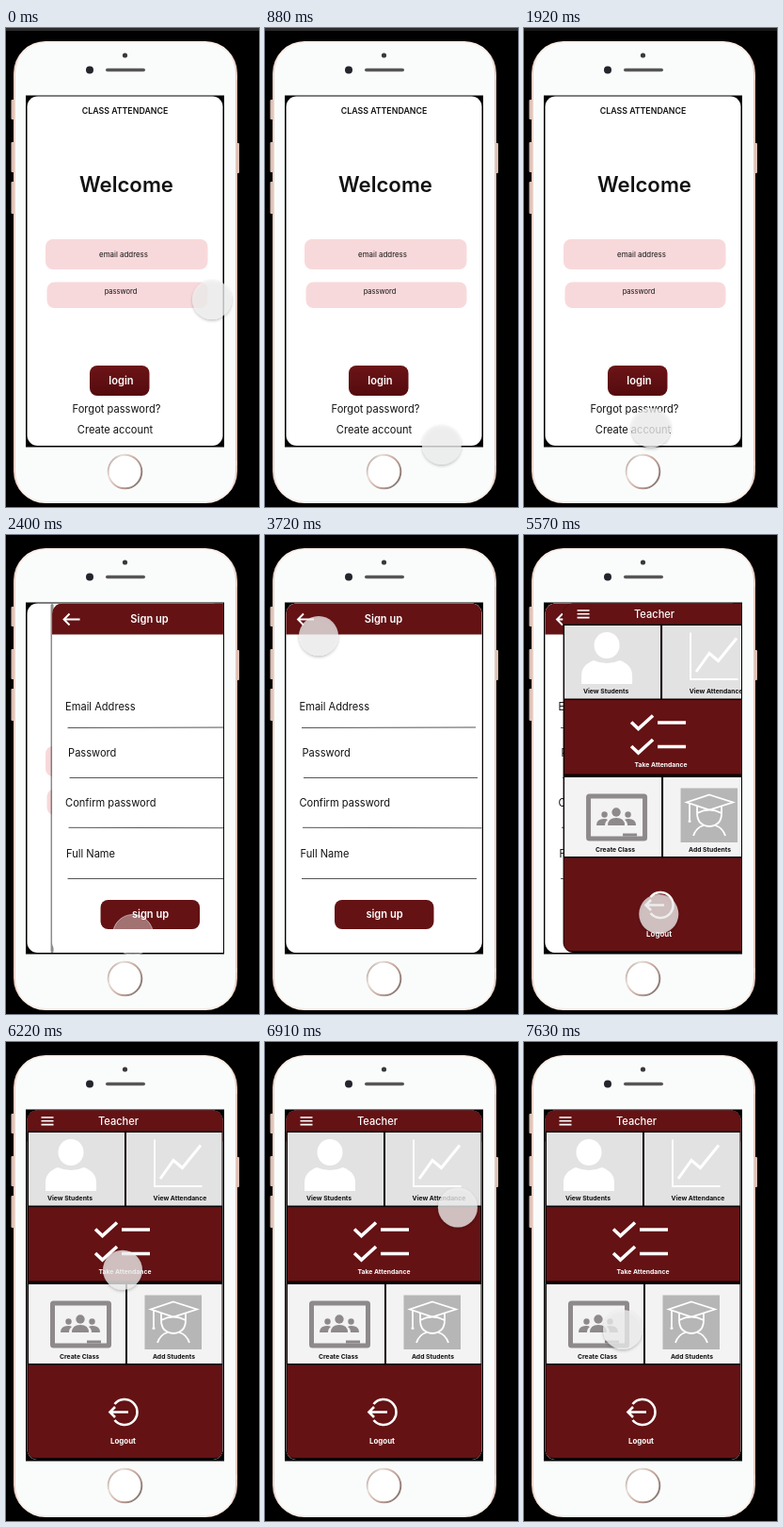
Animation of 269 by 508 pixels, one loop 8000 ms. Source, as an HTML page:

```html
<!DOCTYPE html>
<html lang="en">
<head>
<meta charset="utf-8">
<title>Class attendance prototype</title>
<style>
  html, body { margin: 0; width: 100%; height: 100%; overflow: hidden; background: #000; }
  svg { display: block; width: 269px; height: 508px; }
  text { font-family: Inter, Roboto, sans-serif; font-size: 11.1px; fill: #111; }
  .mid { text-anchor: middle; }
  .bold { font-weight: 600; }
  .light { fill: #fff; }
  .tile { font-size: 6.8px; font-weight: 700; text-anchor: middle; }
  .maroon { fill: #641214; }
  .line { fill: none; stroke: #fff; }
</style>
</head>
<body>
<svg viewBox="0 0 269 508">
  <defs>
    <linearGradient id="rim" x2="1">
      <stop offset="0" stop-color="#e6cbc0"/>
      <stop offset=".03" stop-color="#fbeee8"/>
      <stop offset=".97" stop-color="#fbeee8"/>
      <stop offset="1" stop-color="#dfc2b7"/>
    </linearGradient>
    <linearGradient id="ring" x2="1" y2=".6">
      <stop offset="0" stop-color="#a58d85"/>
      <stop offset=".3" stop-color="#eadfda"/>
      <stop offset=".6" stop-color="#cfaea2"/>
      <stop offset="1" stop-color="#8f7d78"/>
    </linearGradient>
    <linearGradient id="wine" x2="0" y2="1">
      <stop offset="0" stop-color="#6c1417"/>
      <stop offset="1" stop-color="#540b0e"/>
    </linearGradient>
    <filter id="drop" x="-30%" y="-30%" width="160%" height="160%">
      <feDropShadow dx="0" dy="1.5" stdDeviation="1.6" flood-opacity=".32"/>
    </filter>
    <clipPath id="view"><rect x="22" y="72" width="209" height="371.5"/></clipPath>
    <clipPath id="page"><rect x="22.5" y="72.5" width="208" height="370.5" rx="11"/></clipPath>
  </defs>

  <rect width="269" height="508"/>
  <rect id="strip" width="269" height="3"/>

  <!-- phone -->
  <g fill="#dcc0b5">
    <rect x="5.5" y="76" width="4" height="21" rx="1"/>
    <rect x="5.5" y="121" width="4" height="32" rx="1"/>
    <rect x="5.5" y="163" width="4" height="34" rx="1"/>
    <rect x="244.5" y="122" width="3.5" height="32" rx="1"/>
  </g>
  <rect x="8" y="14" width="238" height="490" rx="34" fill="url(#rim)"/>
  <rect x="10" y="16" width="234" height="486" rx="32" fill="#fafcfc"/>
  <g fill="#e5d3cb">
    <path d="M8 50h2v5h-2zM244 50h2v5h-2zM8 459h2v5h-2zM244 459h2v5h-2z"/>
  </g>
  <circle cx="126.5" cy="29" r="2.6" fill="#3a3838"/>
  <circle cx="89" cy="44.5" r="4" fill="#24242c"/>
  <rect x="106" y="42.7" width="42" height="3.6" rx="1.8" fill="#575555"/>
  <circle cx="126.5" cy="470.5" r="17.8" fill="#fff" stroke="url(#ring)" stroke-width="2"/>
  <rect x="21" y="71.5" width="211" height="373"/>

  <g clip-path="url(#view)">
    <g id="login" clip-path="url(#page)">
      <rect x="22" y="72" width="210" height="372" fill="#fff"/>
      <text class="mid bold" x="126.5" y="91" style="font-size:8.8px">CLASS ATTENDANCE</text>
      <text class="mid bold" x="128" y="174" style="font-size:22.2px">Welcome</text>
      <rect x="42" y="224" width="172.5" height="32" rx="8" fill="#f8d9db"/>
      <rect x="43.5" y="269.5" width="171" height="27.5" rx="8" fill="#f8d9db"/>
      <text class="mid" x="125" y="243" style="font-size:7.9px">email address</text>
      <text class="mid" x="122" y="282" style="font-size:7.5px">password</text>
      <rect x="89" y="358" width="63.5" height="32" rx="8" fill="url(#wine)"/>
      <text class="mid bold light" x="122.5" y="377.5">login</text>
      <text class="mid" x="117.5" y="408">Forgot password?</text>
      <text class="mid" x="116" y="429.5">Create account</text>
    </g>

    <g id="signup">
      <rect x="21" y="73" width="3" height="370" rx="1.5" opacity=".45"/>
      <g clip-path="url(#page)">
        <rect x="22" y="72" width="210" height="372" fill="#fff"/>
        <rect class="maroon" x="22" y="72" width="210" height="33.5"/>
        <path class="line" d="M52 89.5H35M41 83.5l-6 6 6 6" stroke-width="1.9"/>
        <text class="mid bold light" x="126" y="93">Sign up</text>
        <text x="36.5" y="185.5">Email Address</text>
        <text x="39.5" y="235">Password</text>
        <text x="36.5" y="288">Confirm password</text>
        <text x="37.5" y="342">Full Name</text>
        <path d="M39 204.5L224 204M41 257.5H226M40 310.3L231 310.8M39 364.5H225" stroke="#555" stroke-width="1"/>
        <rect class="maroon" x="74" y="387" width="105.5" height="31" rx="8"/>
        <text class="mid bold light" x="127" y="406">sign up</text>
      </g>
    </g>

    <g id="teacher">
      <g clip-path="url(#page)">
        <rect x="22" y="72" width="210" height="372" fill="#0b0304"/>
        <g class="maroon">
          <rect x="22" y="72" width="210" height="22.5"/>
          <rect x="24" y="175" width="205" height="78.5"/>
          <path d="M23.5 342.5H230V434q0 7-7 7H30.500q-7 0-7-7z"/>
        </g>
        <path class="line" d="M37.500 80H50.500M37.500 83.800H50.500M37.500 87.600H50.500" stroke-width="1.6"/>
        <text class="mid light" x="119.5" y="87.500" style="font-weight:500">Teacher</text>
        <path d="M24 96h102v77.500h-102zM128 96h101.500v77.500h-101.500z" fill="#e2e2e2"/>
        <path d="M24 257h103v84h-103zM129 257h100.500v84h-100.500z" fill="#f3f3f3"/>

        <ellipse cx="69" cy="117" rx="13.500" ry="14" fill="#fff"/>
        <path d="M42 158v-9q0-11 13-16 14 6 28 0 13 5 13 16v9z" fill="#fff"/>
        <path class="line" d="M158 103.500V153H208.500" stroke-width="2"/>
        <path class="line" d="M164 145L178 125.500 187.500 133.500 207 109.500" stroke-width="3"/>

        <g class="line" stroke-width="3.600">
          <path id="tick" d="M95 198.500L102.500 205.500 118 191.500M123 199H153"/>
          <use href="#tick" y="25.500"/>
        </g>

        <rect x="49.500" y="277" width="60" height="45" rx="1" fill="none" stroke="#8e898b" stroke-width="5"/>
        <g fill="#8e898b">
          <circle cx="79" cy="294" r="4.700"/>
          <circle cx="66.500" cy="296.500" r="3.200"/>
          <circle cx="91.500" cy="296.500" r="3.200"/>
          <path d="M70 308q0-8 9-8t9 8zM58 308q0-7 8-7 3 0 4 1-3 2-3 6zM100 308q0-7-8-7-3 0-4 1 3 2 3 6z"/>
        </g>
        <rect x="86" y="316.500" width="15" height="3" fill="#8e898b"/>

        <rect x="147.500" y="268.500" width="60.500" height="57.500" fill="#b6b6b6"/>
        <g class="line" stroke-width="1.800">
          <path d="M178 275.500L203 283.500 178 291.500 154 283.500zM157 285V303M165 288v7q0 13 13 14 13-1 13-14v-7M165 295q13-7 26 0"/>
          <path d="M161 319q3-9 11-11M195 319q-3-9-11-11"/>
        </g>
        <circle cx="157" cy="303.500" r="1.500" fill="#fff"/>

        <path class="line" d="M115.500 384A13.500 13.500 0 1 1 115.500 401M130 392.500H111M116 387l-5.500 5.500 5.500 5.500" stroke-width="2.600"/>

        <text class="tile" x="68" y="167.500">View Students</text>
        <text class="tile" x="185" y="167.500">View Attendance</text>
        <text class="tile light" x="126.500" y="246">Take Attendance</text>
        <text class="tile" x="78" y="336">Create Class</text>
        <text class="tile" x="178.500" y="336">Add Students</text>
        <text class="tile light" x="124.500" y="425.500" style="font-size:7.900px">Logout</text>
      </g>
    </g>
  </g>

  <g id="cursor">
    <circle id="hover" r="21" fill="#f2f2f2" fill-opacity=".74" filter="url(#drop)"/>
    <circle id="press" r="21.500" fill="#fff" fill-opacity=".4" stroke="#fff" stroke-opacity=".5" stroke-width="1"/>
  </g>
</svg>
<script>
const LOOP = 8000, WIDTH = 209;
const $ = id => document.getElementById(id);
const [strip, signup, teacher, cursor, hover, press] =
  ["strip", "signup", "teacher", "cursor", "hover", "press"].map($);

// time, x, y of the pointer
const path = [
  [0, 219, 288], [100, 219, 288], [400, 243, 390], [650, 234, 476], [880, 188, 442],
  [1200, 152, 432], [1510, 135, 424], [2420, 135, 424], [3020, 118, 201],
  [3450, 57, 107], [3720, 57, 107], [3870, 64, 199], [4430, 138, 421],
  [4560, 138, 421], [4780, 144, 405], [5500, 144, 405], [6120, 124, 276],
  [6220, 124, 242], [6640, 203, 150], [6780, 203, 150], [7000, 206, 205],
  [7250, 180, 296], [7450, 138, 308], [7630, 105, 305], [LOOP, 105, 305]
];

function slope(i, axis) {
  const a = path[i - 1], b = path[i], c = path[i + 1];
  if (!a || !c || (b[axis] - a[axis]) * (c[axis] - b[axis]) <= 0) return 0;
  return (c[axis] - a[axis]) / (c[0] - a[0]);
}

function along(t, axis) {
  const i = path.findIndex(p => p[0] > t) - 1;
  const a = path[i], b = path[i + 1], span = b[0] - a[0];
  const s = (t - a[0]) / span, s2 = s * s, s3 = s2 * s;
  return (2 * s3 - 3 * s2 + 1) * a[axis] + (3 * s2 - 2 * s3) * b[axis]
    + span * ((s3 - 2 * s2 + s) * slope(i, axis) + (s3 - s2) * slope(i + 1, axis));
}

// cubic-bezier(0, 0, .58, 1)
function easeOut(x) {
  let lo = 0, hi = 1;
  for (let n = 0; n < 16; n++) {
    const s = (lo + hi) / 2;
    if (1.74 * s * s - 0.74 * s ** 3 < x) lo = s; else hi = s;
  }
  return 3 * lo * lo - 2 * lo ** 3;
}

function slideIn(node, t, start, shown) {
  const p = Math.min(1, Math.max(0, (t - start) / 300));
  const left = p === 1 ? 0 : WIDTH * (1 - easeOut(p));
  node.setAttribute("visibility", t >= shown ? "visible" : "hidden");
  node.setAttribute("transform", `translate(${left.toFixed(2)} 0)`);
}

function draw(t) {
  strip.setAttribute("fill", t < 1920 ? "#2b2b2b" : t < 2010 ? "#181818" : "#000");
  slideIn(signup, t, 2190, 2240);
  slideIn(teacher, t, 5345, 5400);
  const down = (t >= 2240 && t < 2500) || (t >= 4920 && t < 5520);
  hover.setAttribute("visibility", down ? "hidden" : "visible");
  press.setAttribute("visibility", down ? "visible" : "hidden");
  cursor.setAttribute("transform", `translate(${along(t, 1).toFixed(2)} ${along(t, 2).toFixed(2)})`);
}

const begin = performance.now();
function tick() {
  draw((performance.now() - begin) % LOOP);
  requestAnimationFrame(tick);
}
tick();
</script>
</body>
</html>
```
